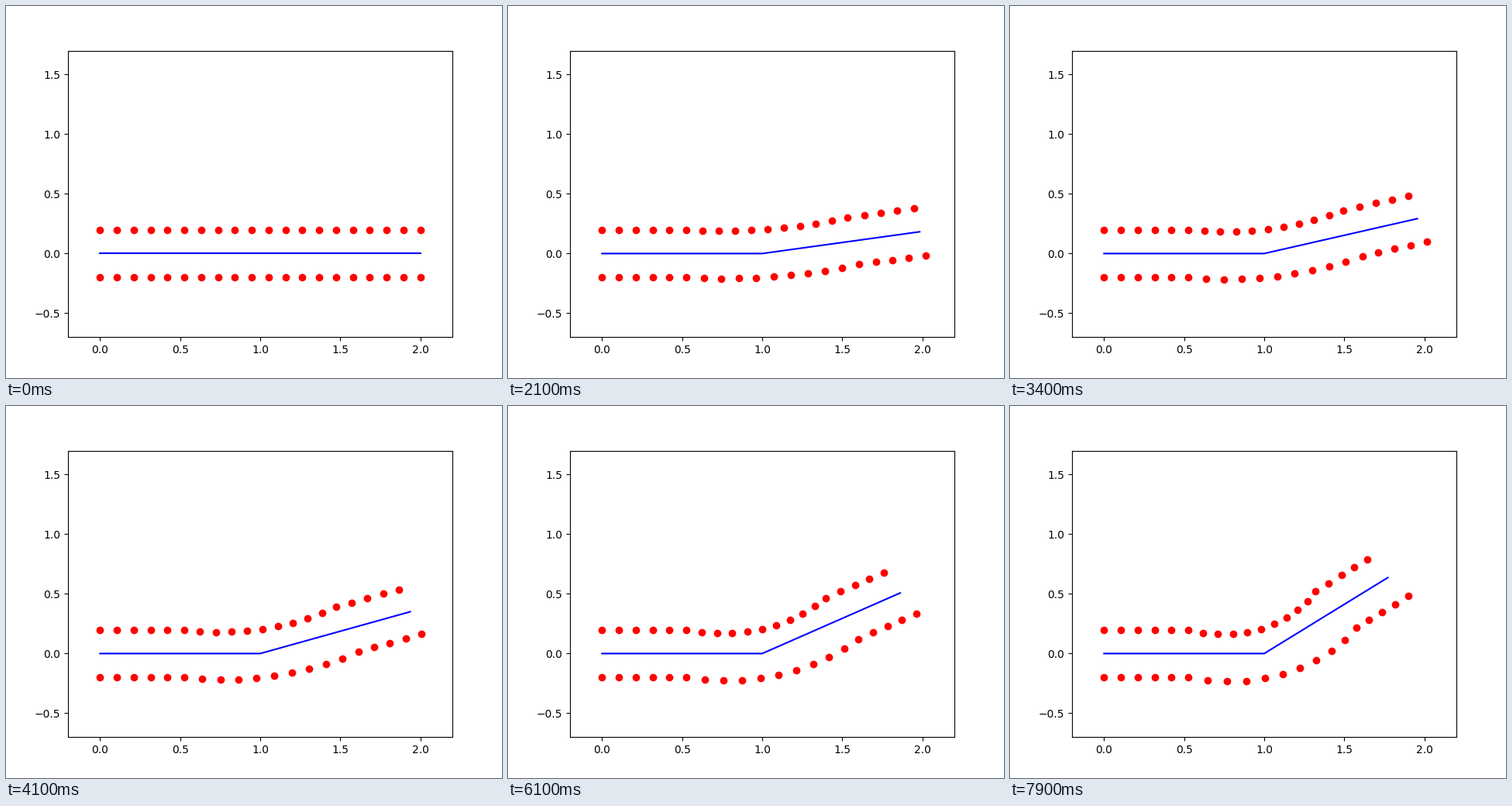
Recreate the animation shown at these times as a matplotlib script. Size 640 by 480 pixels, loop 8 s.

```python
import numpy as np
import matplotlib.pyplot as plt
from matplotlib.animation import FuncAnimation

FRAMES = 80
STEP = np.radians(0.5)  # joint rotation per frame
COUNT = 20
HALF_WIDTH = 0.2
JOINT = np.array([1.0, 0.0])

# Skin points along both sides of a two-bone arm
xs = np.linspace(0, 2, COUNT)
skin = np.vstack([np.column_stack([xs, np.full(COUNT, side)])
                  for side in (HALF_WIDTH, -HALF_WIDTH)])

# Share of the joint angle each point follows: 0 on the first bone, 1 on the second
weights = np.tile(np.clip((np.arange(COUNT) - 5) / 10, 0, 1), 2)


def rotate(points, angles):
    """Rotate points about the joint, each by its own angle."""
    dx, dy = (points - JOINT).T
    c, s = np.cos(angles), np.sin(angles)
    return JOINT + np.column_stack([c * dx - s * dy, s * dx + c * dy])


fig, ax = plt.subplots(figsize=(6.4, 4.8), dpi=100)
ax.set_xlim(-0.2, 2.2)
ax.set_ylim(-0.7, 1.7)
bones, = ax.plot([], [], "b-")
dots, = ax.plot([], [], "ro")


def update(frame):
    angle = frame * STEP
    tip = rotate(np.array([[2.0, 0.0]]), angle)
    bones.set_data(*np.vstack([[0, 0], JOINT, tip]).T)
    dots.set_data(*rotate(skin, weights * angle).T)
    return bones, dots


anim = FuncAnimation(fig, update, frames=FRAMES, interval=100,
                     repeat=True, repeat_delay=0)
plt.show()
```
